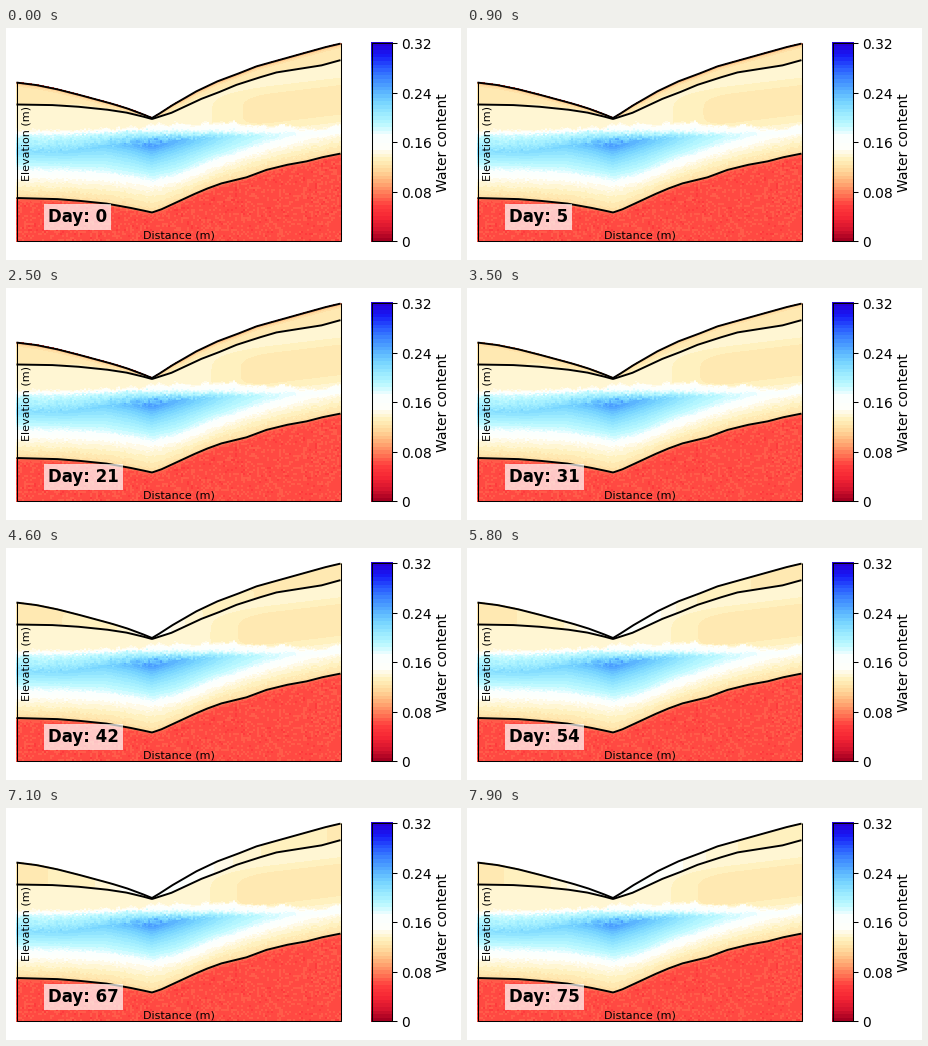
These frames come from a looping animation (455 px wide and 232 px high, 8 s). A matplotlib script:

```python
import numpy as np
import matplotlib.pyplot as plt
from matplotlib.animation import FuncAnimation
from matplotlib.colors import LinearSegmentedColormap

W, H, DPI = 455, 232, 100
FRAMES, STEP = 80, 100
X0, X1, Y0, Y1 = 10, 335, 15, 214
VMAX = 0.32
VALLEY = 146

plt.rcParams["font.family"] = "DejaVu Sans"

STOPS = [(165, 0, 33), (216, 21, 47), (247, 39, 53), (255, 61, 61),
         (255, 120, 86), (255, 172, 117), (255, 214, 153), (255, 241, 188),
         (255, 255, 250), (250, 255, 255), (188, 249, 255), (153, 234, 255),
         (117, 211, 255), (86, 176, 255), (61, 135, 255), (40, 87, 255),
         (24, 28, 247), (36, 0, 216)]
CMAP = LinearSegmentedColormap.from_list("water", np.array(STOPS) / 255, N=54)
CMAP.set_bad("white")


def smooth(v, lo, hi):
    t = np.clip((v - lo) / (hi - lo), 0, 1)
    return t * t * (3 - 2 * t)


def curve(points):
    px, py = zip(*points)
    return np.interp(xs, px, py) + 0.5


xs = np.arange(X0, X1) + 0.5
ys = np.arange(Y0, Y1) + 0.5
X, Y = np.meshgrid(xs, ys)

surface = curve([(10, 54), (30, 56.5), (50, 60.5), (70, 65.5), (90, 71), (105, 75),
                 (120, 79.5), (135, 85), (146, 89.5), (152, 86), (165, 77.5),
                 (190, 63), (211, 53), (230, 46), (250, 38), (275, 31),
                 (300, 24), (320, 18.5), (335, 15)])
soil = curve([(10, 76), (45, 76.5), (70, 78), (100, 81), (120, 84), (135, 87.5),
              (146, 90.5), (165, 84.5), (180, 77.5), (195, 70.5), (211, 64.5),
              (230, 56.5), (250, 50), (270, 44), (295, 40), (315, 37), (335, 31.5)])
rock = curve([(10, 169.5), (30, 170), (50, 170.5), (70, 172), (100, 175), (120, 178.5),
              (135, 181.5), (146, 184), (155, 181), (170, 174), (185, 167), (200, 160.5),
              (215, 155), (240, 149), (260, 141.5), (280, 136.5), (300, 133),
              (315, 129), (335, 125)])

# Shape of the wet zone: rim, cyan edge, core and their lower counterparts.
KEYS = [10, 60, 100, 125, 146, 170, 200, 230, 260, 300, 334]
ZONE = [np.interp(xs, KEYS, row) for row in (
    [102, 102, 101, 98, 97, 96, 95, 95, 97, 100, 98],
    [108, 108, 106, 105, 105, 105, 105, 106, 108, 105, 103],
    [124, 124, 118, 117, 118, 114, 111, 109, 109.5, 106, 104],
    [139, 140, 142, 146, 150, 145, 132, 122, 112, 107, 105],
    [151, 152, 154, 157, 160, 155, 143, 132, 123, 113, 107])]
CORE = np.interp(xs, KEYS, [.213, .217, .222, .234, .247, .236, .22, .2, .182, .168, .165])

rng = np.random.default_rng(4)
cells = rng.normal(0, 1, (len(ys) // 2 + 1, len(xs) // 2 + 1))
grain = np.kron(cells, np.ones((2, 2)))[:len(ys), :len(xs)]
ragged = np.sin(xs / 4.1) + np.sin(xs / 9.7 + 1) + 0.6 * np.sin(xs / 2.3)


def build_base():
    """Static part of the field: the middle layer and the bedrock."""
    v = np.full(X.shape, np.nan)
    for i in range(len(xs)):
        rim, cyan, core, low, edge = (z[i] for z in ZONE)
        rim += ragged[i] * smooth(xs[i], 80, 110)
        knots = [soil[i], rim, rim + 2.5, cyan, core, low, edge, rock[i]]
        peak = CORE[i]
        levels = [.138, .138, .149, min(.18, peak), peak, min(.18, peak), .146, .12]
        v[:, i] = np.interp(ys + 0.8 * grain[:, i], knots, levels)
    fan = np.exp(-np.abs(X - VALLEY) / 28) * np.exp(-((Y - 115) / 7) ** 2)
    v += .008 * fan + .0018 * grain * smooth(v, .165, .2)
    below = Y - rock
    bed = .0635 + .0025 * grain + .022 * np.exp(-np.maximum(below, 0) / 1.6)
    return np.where(below > 0, bed, v)


BASE = build_base()
DEPTH = Y - surface
IN_TOP = (DEPTH >= 0) & (Y < soil)
IN_MID = (Y >= soil) & (Y < rock)
DRY_PATCH = (smooth(X, 185, 265) * np.exp(-((Y - 84 + 0.12 * (X - 240)) / 19) ** 4)
             * (BASE < .146) * IN_MID * (Y < ZONE[0] + 2))


def field(day):
    v = BASE - (.011 + .002 * smooth(day, 0, 60)) * DRY_PATCH
    skin = .07 * np.exp(-np.maximum(DEPTH, 0) / 2) * (1 - smooth(day, 22, 43))
    wet = smooth(day, 29, 52)
    reach = 20 + max(day - 30, 0) * np.where(X > VALLEY, 1.5, 0.45)
    near = np.exp(-(np.abs(X - VALLEY) / reach) ** 1.5)
    top = np.minimum(.129 + .006 * np.exp(-np.abs(X - VALLEY) / 60)
                     + .035 * wet * near, .16) - skin
    v = np.where(IN_TOP, top, v)
    return np.ma.masked_where(DEPTH < 0, v)


# The tiny margin keeps the pixel size from rounding down.
fig = plt.figure(figsize=((W + 1e-4) / DPI, (H + 1e-4) / DPI), dpi=DPI, facecolor="white")
ax = fig.add_axes([0, 0, 1, 1])
ax.axis("off")

image = ax.imshow(field(0), cmap=CMAP, vmin=0, vmax=VMAX, interpolation="nearest",
                  extent=(X0, X1, Y1, Y0), aspect="auto")
bar = np.linspace(VMAX, 0, Y1 - Y0)[:, None]
ax.imshow(bar, cmap=CMAP, vmin=0, vmax=VMAX, interpolation="nearest",
          extent=(365, 386, Y1, Y0), aspect="auto")
ax.set_xlim(0, W)
ax.set_ylim(H, 0)


def stroke(px, py, width=0.75):
    ax.plot(px, py, color="black", lw=width, solid_capstyle="butt",
            solid_joinstyle="miter" if width < 1 else "round")


stroke([10.5, 10.5, 334.5, 334.5], [54, 213.5, 213.5, 15])
for line in (surface, soil, rock):
    stroke(xs, line, 1.4)

stroke([365.5, 385.5, 385.5, 365.5, 365.5], [15.5, 15.5, 213.5, 213.5, 15.5])
for k, label in enumerate(("0", "0.08", "0.16", "0.24", "0.32")):
    y = 213.5 - 49.5 * k
    stroke([386, 390.5], [y, y])
    ax.text(395.2, y, label, fontsize=10, va="center_baseline")

ax.text(437.3, 114.8, "Water content", fontsize=10, rotation=90, ha="center", va="center")
ax.text(20.8, 115, "Elevation (m)", fontsize=8, rotation=90, ha="center", va="center")
ax.text(173, 210, "Distance (m)", fontsize=8, ha="center", va="baseline")
counter = ax.text(42.1, 194, "", fontsize=12, weight="bold", va="baseline",
                  bbox=dict(boxstyle="square,pad=0.25", fc="white", ec="none", alpha=0.7))


def update(frame):
    day = max(0, frame - 4)
    image.set_data(field(day))
    counter.set_text(f"Day: {day}")
    return image, counter


anim = FuncAnimation(fig, update, frames=FRAMES, interval=STEP, repeat=True,
                     repeat_delay=0, init_func=lambda: update(0))
plt.show()
```
